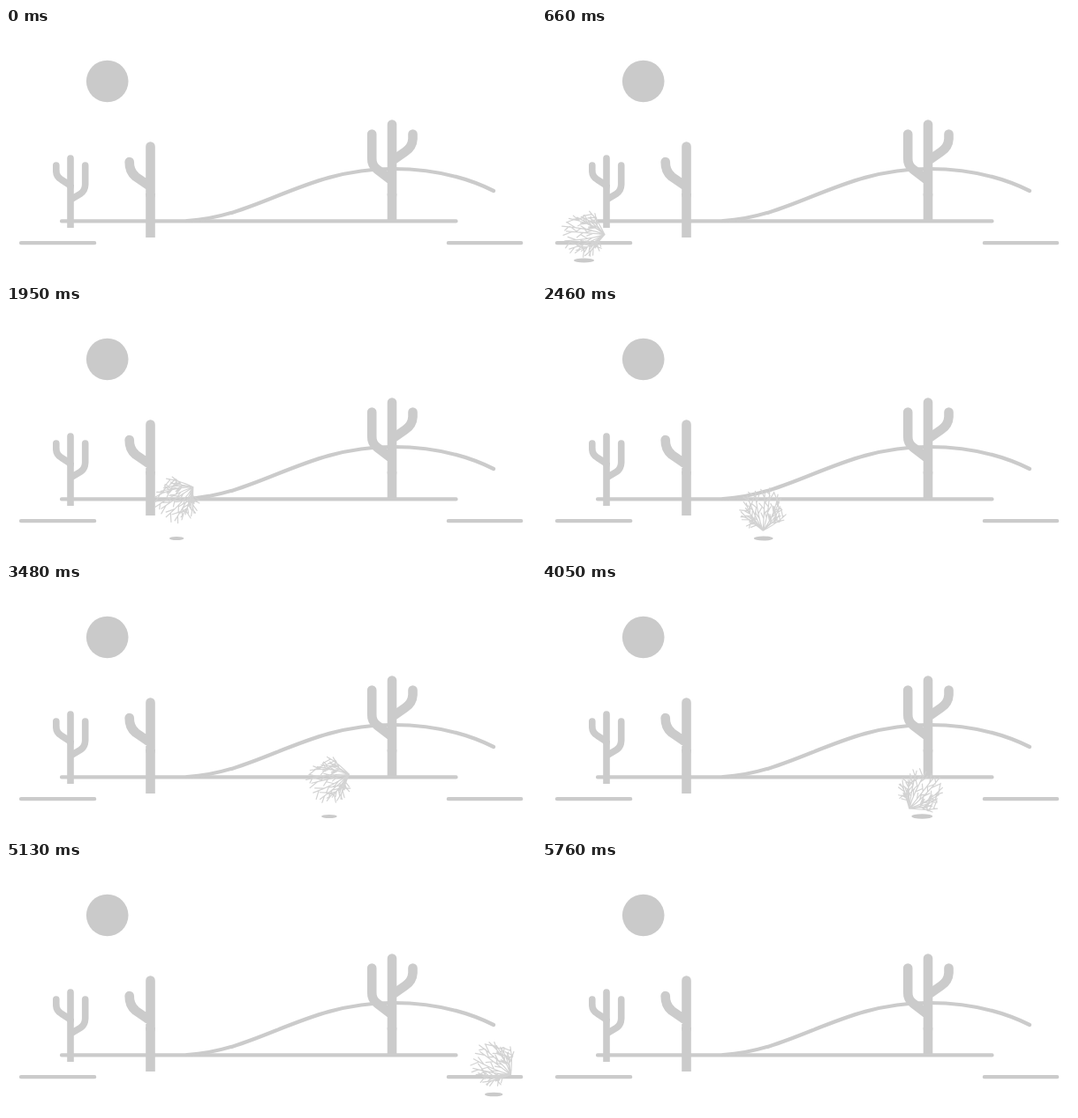
Recreate the animation shown at these times as an HTML page. Size 600 by 284 pixels, loop 9 s.

```html
<!DOCTYPE html>
<html lang="en">
<head>
<meta charset="utf-8">
<title>Desert tumbleweed</title>
<style>
html, body { margin: 0; width: 100%; height: 100%; overflow: hidden; background: #fff; }
svg { display: block; width: 600px; height: 284px; }
path { fill: none; stroke: #cbcbcb; stroke-linecap: round; stroke-linejoin: round; }
circle, ellipse { fill: #cacaca; }
.butt path { stroke-linecap: butt; }
#weed path { stroke: #d3d3d3; stroke-width: 1.2; }
</style>
</head>
<body>
<svg viewBox="0 0 600 284">
  <circle cx="114.7" cy="60.5" r="23.8"/>
  <g stroke-width="4.2">
    <path d="M63 219.4H509.5M17 244.2H100.2M500.8 244.2H583.2"/>
    <path d="M205 219C288 214 338 160 438 160C482 160 518 168 552 185"/>
  </g>
  <g stroke-width="7.6">
    <path d="M73 148V180M56.8 156V163Q57 169 63 172.500L73 179M89.700 156V178Q89.500 185 84 188.500L74 194.500"/>
    <g class="butt"><path d="M73 178V227"/></g>
  </g>
  <g stroke-width="10.6">
    <path d="M163.500 134.500V190M139.700 152Q139.500 163 147 169L163 180"/>
    <g class="butt"><path d="M163.500 188V238"/></g>
    <path d="M437 109.500V190M414.200 120.500V148Q414 156 420 160.500L437 173.500M460.500 120.500V126Q460 135 452 140.500L437 151"/>
    <g class="butt"><path d="M437 188V219"/></g>
  </g>
  <g id="roller">
    <ellipse id="shadow" cy="264"/>
    <g id="weed"><path id="twigs"/></g>
  </g>
</svg>
<script>
const $ = id => document.getElementById(id);
const LOOP = 9000, END = 5760, STEP = 30;
const SPEED = 0.1129, BOUNCE = 872, LOW = 568, RADIUS = 26;

let seed = 17;
const rnd = (a, b) => {
  seed = (seed * 16807) % 2147483647;
  return a + (b - a) * seed / 2147483647;
};
const pt = (x, y) => {
  const k = Math.min(1, 26.5 / Math.hypot(x, y));
  return (x * k).toFixed(1) + ' ' + (y * k).toFixed(1);
};

// Stems fan out from one root and carry short side twigs.
function bush() {
  let d = '';
  const n = 13;
  for (let i = 0; i < n; i++) {
    const a = -2.25 + 4.5 * i / (n - 1) + rnd(-0.12, 0.12);
    const r = rnd(19, 26);
    const ex = r * Math.sin(a), ey = -r * Math.cos(a);
    const cx = ex * rnd(0.5, 1), cy = 10 + ey * 0.2;
    d += `M0 24Q${pt(cx, cy)} ${pt(ex, ey)}`;
    for (let j = 0; j < 5; j++) {
      const u = 0.35 + j * 0.13, v = 1 - u;
      const x = 2 * u * v * cx + u * u * ex;
      const y = v * v * 24 + 2 * u * v * cy + u * u * ey;
      const dir = Math.atan2(ey - y, ex - x) + (j % 2 ? 1 : -1) * rnd(0.4, 0.9);
      const len = rnd(6, 11);
      d += `M${pt(x, y)}L${pt(x + len * Math.cos(dir), y + len * Math.sin(dir))}`;
    }
  }
  return d;
}
$('twigs').setAttribute('d', bush());

function draw(now) {
  const t = Math.floor((now % LOOP) / STEP) * STEP;
  $('roller').style.display = t < END ? '' : 'none';
  const x = -27.5 + SPEED * t;
  const lift = 0.5 - 0.5 * Math.cos(2 * Math.PI * (t - LOW) / BOUNCE);
  const turn = (t - 2460) * SPEED / RADIUS * 180 / Math.PI;
  $('weed').setAttribute('transform', `translate(${x} ${235.5 - 16.5 * lift}) rotate(${turn})`);
  const s = $('shadow');
  s.setAttribute('cx', x + 0.5);
  s.setAttribute('rx', 12 - 4 * lift);
  s.setAttribute('ry', 2.7 - 0.8 * lift);
}

const start = performance.now();
function tick() {
  draw(performance.now() - start);
  requestAnimationFrame(tick);
}
tick();
</script>
</body>
</html>
```
